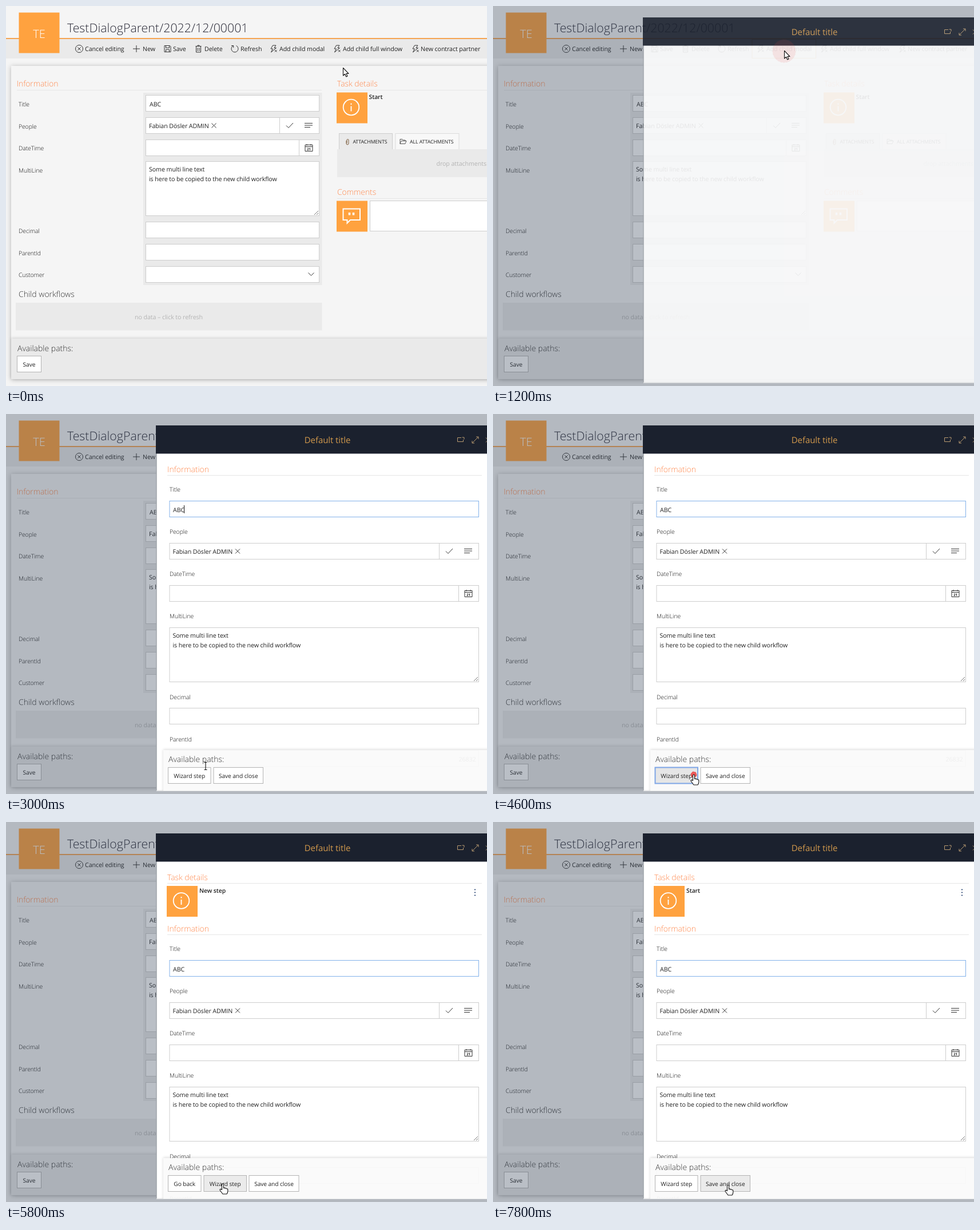
Write an HTML page that moves like this. It is 841 px wide and 666 px high and loops after 8000 ms.

```html
<!DOCTYPE html>
<html lang="en">
<head>
<meta charset="utf-8">
<title>Dialog wizard</title>
<style>
html, body { margin: 0; width: 100%; height: 100%; overflow: hidden; background: #f5f5f5; }
svg { display: block; width: 841px; height: 666px; }
text { font: 400 10.67px "Open Sans", "Noto Sans", sans-serif; letter-spacing: -.08px; fill: #222; white-space: pre; text-rendering: geometricPrecision; }
.label { font-weight: 300; font-size: 10.4px; fill: #111; }
.head { font-weight: 300; font-size: 14px; fill: #ff8a50; }
.sub { font-weight: 300; font-size: 14px; fill: #333; letter-spacing: 0; }
.title { font-weight: 300; font-size: 21.3px; fill: #2b2b38; letter-spacing: 0; }
.badge { font-weight: 300; font-size: 20px; fill: #fff; letter-spacing: 0; }
.dialog { font-size: 15px; fill: #d2994c; }
.step { font-weight: 600; font-size: 10.4px; }
.tab { font-size: 8.8px; }
.btn { font-size: 10.2px; }
.hint { fill: #b4b4b4; }
.mid { text-anchor: middle; }
.icon { fill: none; stroke: #333; stroke-width: 1; }
</style>
</head>
<body>
<svg id="stage" viewBox="0 0 841 666" xmlns="http://www.w3.org/2000/svg"></svg>
<script>
const ORANGE = '#ffa23f', GREY = '#eaeaea', LINE = '#cdcdcd';
const PERSON = 'Fabian Dösler ADMIN';
const NOTE = ['Some multi line text', 'is here to be copied to the new child workflow'];

const text = (x, y, s, cls = '') => `<text x="${x}" y="${y}" class="${cls}">${s}</text>`;
const rect = (x, y, w, h, fill, stroke = 'none', extra = '') =>
  `<rect x="${x}" y="${y}" width="${w}" height="${h}" fill="${fill}" stroke="${stroke}" ${extra}/>`;
const path = (x, y, d, extra = '') => `<path class="icon" transform="translate(${x} ${y})" d="${d}" ${extra}/>`;
const group = (id, body, extra = '') => `<g id="${id}" ${extra}>${body}</g>`;
const rule = (x, y, w) => rect(x, y, w, 1, '#e6e6e6');
const box = (x, y, w, h = 28, stroke = LINE) => rect(x + .5, y + .5, w, h, '#fff', stroke);

const ICON = {
  cancel: 'M-6.5 0a6.5 6.5 0 1 0 13 0a6.5 6.5 0 1 0-13 0M-2.7-2.7L2.7 2.7M2.7-2.7L-2.7 2.7',
  plus: 'M-6 0H6M0-6V6',
  save: 'M-5.5-5.5H4L5.5-4V5.5H-5.5ZM-3-5.5V-1.5H3V-5.5M-3 5.5V1.5H3V5.5',
  trash: 'M-5-4.5H5M-1.5-4.5V-6H1.5V-4.5M-4-4.5V6H4V-4.5M-1.5-2V4M1.5-2V4',
  refresh: 'M-2.5-5.5A6 6 0 1 0 2.5-5.5M-6-5.5H-2.3V-1.8',
  bolt: 'M-1.5-6H4L1-1.5H4.5L-4.5 6L-1.5 0H-5ZM2 2L5.5 5.5M5.5 2L2 5.5',
  cross: 'M-4-4L4 4M4-4L-4 4',
  check: 'M-6 0L-2 4L6-4.5',
  lines: 'M-7-3.5H7M-7 0H7M-7 3.5H3',
  calendar: 'M-6.5-5H6.5V6H-6.5ZM-6.5-2H6.5M-3.5-6.5V-4M3.5-6.5V-4',
  chevron: 'M-5-2.5L0 2.5L5-2.5',
  clip: 'M-2-2V3a2 2 0 0 0 4 0V-3a1.5 1.5 0 0 0-3 0V2.5',
  folder: 'M-5 4V-4H-1L0-2.5H4V-1M-5 4L-3-1H6L4 4Z',
  popout: 'M1-3.5H-5.5V3.5H4.5V0M2.5-4H6V-.5',
  expand: 'M-5.5 5.5L5.5-5.5M1.5-5.5H5.5V-1.5M-5.5 1.5V5.5H-1.5'
};
const icon = (name, x, y, extra) => path(x, y, ICON[name], extra);

const person = (x, y, w) => box(x, y, w) + text(x + 6, y + 19, PERSON) + icon('cross', x + 119.5, y + 14.5) +
  path(x + w - 68.5, y + .5, 'M0 0V28', `style="stroke:${LINE}"`) +
  icon('check', x + w - 51, y + 14.5) + icon('lines', x + w - 18, y + 14);

const date = (x, y, w) => box(x, y, w) + path(x + w - 34.5, y + .5, 'M0 0V28', `style="stroke:${LINE}"`) +
  icon('calendar', x + w - 17.5, y + 14.5) +
  `<text x="${x + w - 17.5}" y="${y + 19}" class="mid" style="font-size:6px;font-weight:700">21</text>`;

const memo = (x, y, w) => box(x, y, w, 95) + NOTE.map((s, i) => text(x + 6, y + 18 + 17 * i, s)).join('') +
  path(x + w - 1, y + 94, 'M-7 0L0-7M-3 0L0-3', 'style="stroke:#777"');

const infoTile = (x, y) => rect(x, y, 54, 54, ORANGE) +
  `<g fill="none" stroke="#fff" stroke-width="1.8"><circle cx="${x + 25.5}" cy="${y + 26}" r="13.8"/>` +
  `<path d="M${x + 25.5} ${y + 24}v9M${x + 25.5} ${y + 19}v2.4"/></g>`;

const button = (x, y, w, label, id = '') =>
  rect(x + .5, y + .5, w, 28, '#fff', '#b4b4b4', id && `id="${id}"`) + text(x + w / 2 + .5, y + 18.5, label, 'btn mid');

const tools = [
  ['cancel', 128, 138, 'Cancel editing'], ['plus', 228, 239, 'New'], ['save', 282.5, 292, 'Save'],
  ['trash', 336.5, 347, 'Delete'], ['refresh', 400, 410, 'Refresh'], ['bolt', 468, 478, 'Add child modal'],
  ['bolt', 579, 589, 'Add child full window'], ['bolt', 716, 725, 'New contract partner']
];

const page = [
  rect(0, 0, 841, 666, '#f5f5f5'), rect(0, 58, 841, 34, GREY), rect(0, 56, 841, 2, '#f5a452'),
  rect(22.5, 11.5, 71, 71, ORANGE), text(58, 56, 'TE', 'badge mid'),
  text(107, 46, 'TestDialogParent/2022/12/00001', 'title'),
  rect(453, 58.5, 111.5, 33, '#efefef', '#cf9f58', 'id="toolHover"'),
  ...tools.map(([name, ix, tx, s]) => icon(name, ix, 75) + text(tx, 79, s)),
  rect(9, 105, 850, 549, '#f5f5f5', 'none', 'filter="url(#soft)"'),
  text(18.5, 141, 'Information', 'head'), rule(19, 147, 533),
  rect(240, 152, 312.5, 337, GREY),
  ...[['Title', 176], ['People', 214.5], ['DateTime', 253], ['MultiLine', 292], ['Decimal', 398], ['ParentId', 437], ['Customer', 475]]
    .map(([s, y]) => text(22, y, s, 'label')),
  box(244, 156, 303), text(251, 176, 'ABC'),
  person(244, 195, 303), date(244, 234, 303), memo(244, 272, 303),
  box(244, 378, 303), box(244, 417, 303), box(244, 456, 303), icon('chevron', 533.5, 470),
  text(22, 510, 'Child workflows', 'sub'),
  rect(17, 520, 535.5, 48.5, GREY), text(284.5, 548.5, 'no data – click to refresh', 'hint mid'),
  rect(9, 583, 850, 71, GREY, 'none', 'filter="url(#lift)"'),
  text(20, 605, 'Available paths:', 'sub'), button(19, 613, 42, 'Save'),
  text(579, 141, 'Task details', 'head'), rule(579, 147, 262),
  infoTile(578, 151.5), text(634.5, 163, 'Start', 'step'),
  rect(582.5, 223.5, 93, 28, GREY, LINE), rect(681, 223.5, 111, 28, '#f8f8f8', '#dcdcdc'),
  rect(579, 251, 262, 49, GREY),
  icon('clip', 597, 238, 'style="stroke:#7a5a3a"'), text(606.5, 240.5, 'ATTACHMENTS', 'tab'),
  icon('folder', 694, 237.5, 'style="stroke-width:.8"'), text(706, 240.5, 'ALL ATTACHMENTS', 'tab'),
  text(752.5, 280, 'drop attachments', 'hint'),
  text(579, 331, 'Comments', 'head'), rule(579, 337, 262),
  rect(578, 341.5, 54, 54, ORANGE),
  path(578, 341.5, 'M11.5 14H41V33.5H24L18.5 39V33.5H11.5Z', 'style="stroke:#fff;stroke-width:2"'),
  path(578, 341.5, 'M22.5 20.5v4.5M29.5 20.5v4.5', 'style="stroke:#fff;stroke-width:3.5"'),
  box(636, 341, 220, 53)
].join('');

const form = [
  text(282, 102, 'Information', 'head'), rule(282, 107, 550),
  ...[['Title', 136], ['People', 210], ['DateTime', 284], ['MultiLine', 358], ['Decimal', 499.5], ['ParentId', 573.5]]
    .map(([s, y]) => text(286, y, s, 'label')),
  box(285.5, 152, 540.5, 28, '#83b2ea'), text(292, 171.5, 'ABC'),
  rect(311, 160, 1, 14, '#111', 'none', 'id="caret"'),
  person(285.5, 226, 540.5), date(285.5, 300, 540.5), memo(285.5, 374, 540.5),
  box(285.5, 515, 540.5), box(285.5, 589, 540.5),
  text(791.5, 609, '26832')
].join('');

const task = text(282, 102, 'Task details', 'head') + rule(282, 107, 550) + infoTile(281, 112) +
  '<text id="stepName" x="338" y="124" class="step"></text>' +
  [118.5, 123.5, 128.5].map(y => `<circle cx="820" cy="${y}" r="1.1" fill="#24406e"/>`).join('');

const modal = [
  rect(263, 20, 600, 641, '#fff'),
  rect(262.5, 69, 1.2, 591, '#989da3'), rect(263, 659.5, 600, 1, '#d5d7d9'),
  rect(262, 20, 600, 49.5, '#1b212e'),
  text(562, 51, 'Default title', 'dialog mid'),
  icon('popout', 795, 45, 'style="stroke:#b89a70"'), icon('expand', 820.5, 45.5, 'style="stroke:#b89a70"'),
  icon('cross', 843, 45.5, 'style="stroke:#b89a70"'),
  `<g clip-path="url(#body)">`, group('task', task), group('form', form),
  group('footer',
    rect(275, 589, 600, 90, '#fafafa', 'none', 'filter="url(#lift)" opacity=".95"') +
    text(284, 610, 'Available paths:', 'sub') +
    group('twoPaths', button(283, 619, 74.5, 'Wizard step', 'wizard') + button(362.5, 619, 86.5, 'Save and close', 'close')) +
    group('threePaths', button(283, 619, 57.5, 'Go back') + button(345.5, 619, 74.5, 'Wizard step', 'wizard2') +
      button(424.5, 619, 87, 'Save and close'))),
  '</g>'
].join('');

const pointer = (id, d, fill = '#fff') =>
  `<path id="${id}" d="${d}" fill="${fill}" stroke="#111" stroke-width="1.1" stroke-linejoin="round"/>`;

const stage = document.getElementById('stage');
stage.innerHTML = `<defs>
  <filter id="soft" x="-5%" y="-5%" width="110%" height="110%"><feDropShadow dx="0" dy="1" stdDeviation="4" flood-opacity=".28"/></filter>
  <filter id="lift" x="-5%" y="-20%" width="110%" height="140%"><feDropShadow dx="0" dy="-1" stdDeviation="2.5" flood-opacity=".16"/></filter>
  <clipPath id="body"><rect x="263" y="69" width="578" height="591"/></clipPath></defs>` +
  page + rect(0, 0, 841, 666, '#354558', 'none', 'id="shade"') + group('modal', modal) +
  '<circle id="ripple" fill="#f04a4a" stroke="#d83a3a" stroke-dasharray="3 2"/>' +
  group('cursor',
    pointer('arrow', 'M.5.5V14L3.6 11.2L5.8 16L8 15L5.9 10.4H10Z') +
    pointer('beam', 'M-2.5-6.5H-.5L0-6L.5-6.5H2.5M0-6V6M-2.5 6.5H-.5L0 6L.5 6.5H2.5', 'none') +
    pointer('hand', 'M-1.5 10.5V1.5a1.5 1.5 0 0 1 3 0V7.5Q3 6.5 4 8Q5.6 7 6.5 8.8Q8.8 8.3 8.8 10.5V13Q8.8 15.5 7 18H0Q-1.5 16-4.8 11.5Q-5.3 9.3-3.5 9.3Z'));

const el = Object.fromEntries([...stage.querySelectorAll('[id]')].map(n => [n.id, n]));
const show = (id, on) => el[id].setAttribute('visibility', on ? 'inherit' : 'hidden');
const between = (t, a, b) => t >= a && t < b;

const LOOP = 8000, TICK = 200;
const track = [ // time, x, y of the pointer
  [0, 589, 108], [200, 579, 105], [700, 509, 78], [1400, 509, 78], [2200, 380, 570], [3000, 349, 617],
  [3400, 351, 632], [5000, 351, 632], [5400, 379, 634], [6600, 379, 634], [7200, 430, 638], [7800, 411, 636], [8000, 411, 636]
];
const clicks = [[800, 509, 79], [4600, 351, 632], [6000, 379, 635]];

function pointerAt(t) {
  const i = Math.max(1, track.findIndex(k => k[0] > t));
  const [t0, x0, y0] = track[i - 1], [t1, x1, y1] = track[i];
  const p = (t - t0) / (t1 - t0), e = p * p * (3 - 2 * p);
  return [x0 + (x1 - x0) * e, y0 + (y1 - y0) * e];
}

function paintButton(id, fill, stroke = '#b4b4b4', width = 1) {
  el[id].setAttribute('fill', fill);
  el[id].setAttribute('stroke', stroke);
  el[id].setAttribute('stroke-width', width);
}

function draw(t) {
  const fade = t < 1000 ? 0 : t < 1200 ? .17 : t < 1400 ? .88 : 1;
  el.modal.setAttribute('opacity', fade);
  el.shade.setAttribute('opacity', t < 1000 ? 0 : t < 1200 ? .07 : .34);
  show('toolHover', between(t, 600, 1400));

  const wizard = t >= 5200, second = between(t, 5200, 6800);
  show('form', t >= 2000 && !between(t, 4800, 5200) && !between(t, 6400, 6800));
  show('task', wizard && !between(t, 6400, 6800));
  show('footer', t >= 2000);
  show('twoPaths', !second);
  show('threePaths', second);
  el.form.setAttribute('transform', `translate(0 ${wizard ? 90 : 0})`);
  el.stepName.textContent = second ? 'New step' : 'Start';

  const focus = t < 4600 ? 2000 : t < 6800 ? 5200 : 6900;
  const typing = between(t, 2000, 4600) || between(t, 5200, 6400) || t >= 6900;
  el.caret.setAttribute('opacity', typing && Math.floor((t - focus) / 500) % 2 === 0 ? 1 : 0);

  if (between(t, 4600, 5200)) paintButton('wizard', '#e6e6e6', '#7fa6e6', 2);
  else paintButton('wizard', between(t, 3800, 4600) ? '#ebebeb' : '#fff');
  if (between(t, 6000, 6800)) paintButton('wizard2', '#e6e6e6', '#7fa6e6', 2);
  else paintButton('wizard2', between(t, 5400, 6000) ? '#ebebeb' : '#fff');
  paintButton('close', t >= 7000 ? '#ebebeb' : '#fff');

  const click = clicks.find(c => between(t, c[0], c[0] + 600));
  show('ripple', click);
  if (click) {
    const age = (t - click[0]) / 400;
    el.ripple.setAttribute('cx', click[1]);
    el.ripple.setAttribute('cy', click[2]);
    el.ripple.setAttribute('r', 5 + 15 * age);
    el.ripple.setAttribute('opacity', .9 - .79 * age);
  }

  el.cursor.setAttribute('transform', `translate(${pointerAt(t).join(' ')})`);
  show('beam', between(t, 2800, 3400));
  show('hand', t >= 3400);
  show('arrow', t < 2800);
}

function frame() {
  const t = performance.now() % LOOP;
  draw(Math.floor(t / TICK) * TICK);
  requestAnimationFrame(frame);
}
frame();
</script>
</body>
</html>
```
